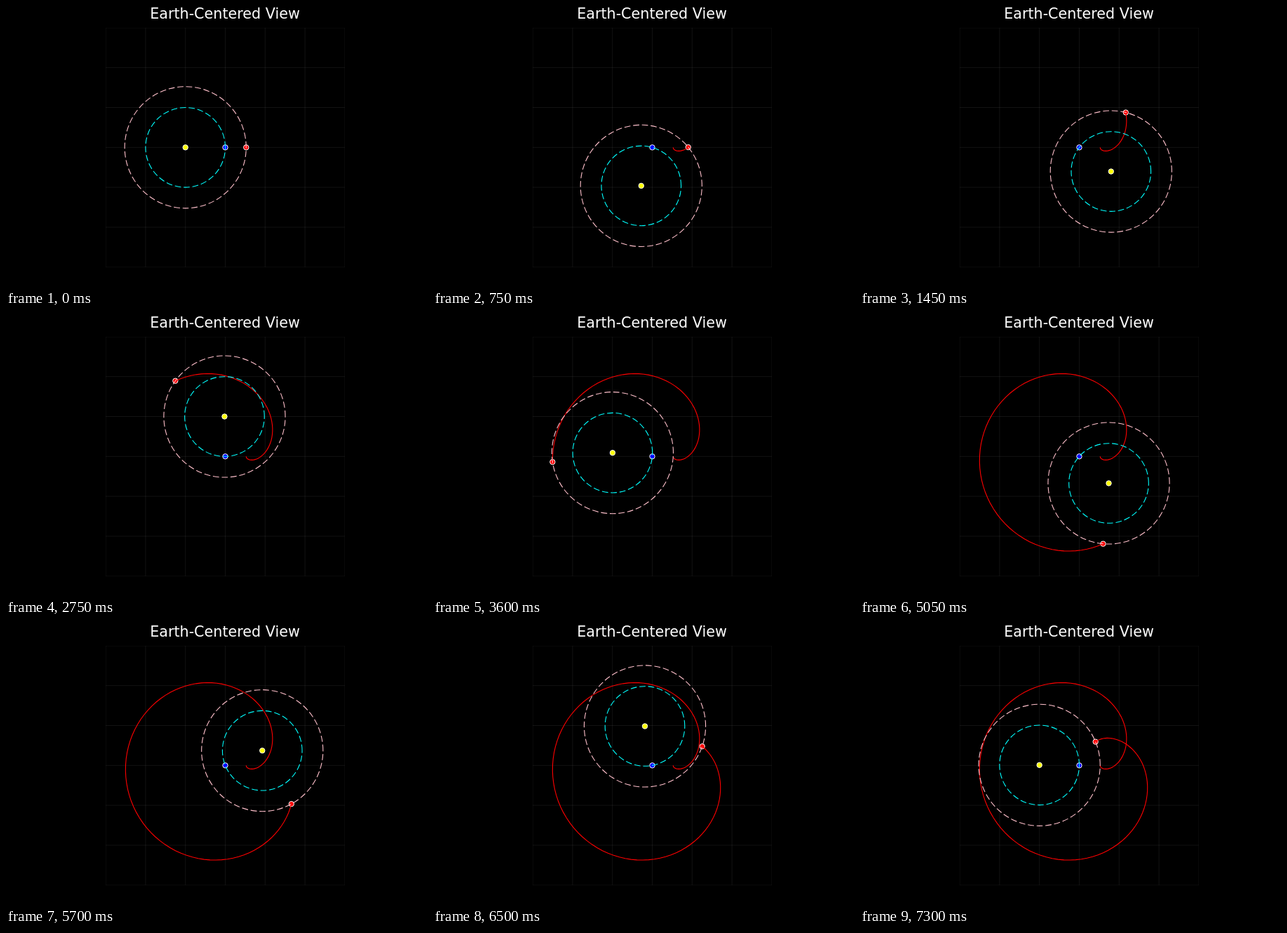
Recreate the animation shown at these times as an HTML page. Size 600 by 400 pixels, loop 7.35 s.

```html
<!DOCTYPE html>
<html lang="en">
<head>
<meta charset="utf-8">
<title>Earth-Centered View</title>
<style>
html, body { margin: 0; width: 100%; height: 100%; overflow: hidden; background: #000; }
svg { display: block; width: 600px; height: 400px; }
text { font: 20.7px "DejaVu Sans", sans-serif; fill: #fff; text-anchor: middle; }
</style>
</head>
<body>
<svg id="stage" viewBox="0 0 600 400"></svg>
<script>
const FRAME = 50, COUNT = 147, DAYS = 5;
const UNIT = 56.8, EARTH = { x: 312.5, y: 201.3 };
const EARTH_ORBIT = { r: UNIT, period: 365.25 };
const MARS_ORBIT = { r: UNIT * 1.524, period: 687 };
const LINE = 1.1;
const stage = document.getElementById("stage");

function add(tag, attrs, parent = stage) {
  const el = document.createElementNS("http://www.w3.org/2000/svg", tag);
  for (const key in attrs) el.setAttribute(key, attrs[key]);
  return parent.appendChild(el);
}

// Offset of a planet from the sun, with y pointing down.
function offset(orbit, frame) {
  const a = 2 * Math.PI * frame * DAYS / orbit.period;
  return { x: orbit.r * Math.cos(a), y: -orbit.r * Math.sin(a) };
}

function sunAt(frame) {
  const e = offset(EARTH_ORBIT, frame);
  return { x: EARTH.x - e.x, y: EARTH.y - e.y };
}

function marsAt(frame) {
  const s = sunAt(frame), m = offset(MARS_ORBIT, frame);
  return { x: s.x + m.x, y: s.y + m.y };
}

function marker(fill) {
  return add("circle", { r: 3.7, fill, stroke: "#fff", "stroke-width": 1 });
}

// Starts at the right and runs counterclockwise, which sets the dash phase.
function orbitPath(r, stroke) {
  return add("path", {
    d: `M${r} 0A${r} ${r} 0 0 0 ${-r} 0A${r} ${r} 0 0 0 ${r} 0`,
    fill: "none", stroke, "stroke-width": LINE, "stroke-dasharray": "8.8 3.8"
  });
}

function place(el, p) {
  el.setAttribute("transform", `translate(${p.x.toFixed(2)} ${p.y.toFixed(2)})`);
}

// The plot area cuts the outermost grid lines in half.
const left = 142.1, top0 = 30.9, side = 6 * UNIT;
const plot = add("svg", { x: left, y: top0, width: side, height: side, overflow: "hidden" });
plot.style.cssText = `width:${side}px;height:${side}px`;
for (let i = 0; i < 7; i++) {
  const p = i * UNIT;
  add("path", {
    d: `M${p} 0V${side}M0 ${p}H${side}`,
    stroke: "#fff", "stroke-opacity": 0.07, "stroke-width": 1
  }, plot);
}
add("text", { x: 312, y: 18 }).textContent = "Earth-Centered View";

const sun = marker("#ff0");
const earth = marker("#00f");
const mars = marker("#f00");
const trail = add("polyline", { fill: "none", stroke: "#f00", "stroke-width": LINE });
const inner = orbitPath(EARTH_ORBIT.r, "#0ff");
const outer = orbitPath(MARS_ORBIT.r, "#ffc0cb");
place(earth, EARTH);

const points = Array.from({ length: COUNT }, (_, i) => {
  const p = marsAt(i);
  return `${p.x.toFixed(2)},${p.y.toFixed(2)}`;
});

let shown = -1;
function draw(now) {
  const frame = Math.floor(now / FRAME) % COUNT;
  if (frame !== shown) {
    shown = frame;
    const s = sunAt(frame);
    for (const el of [sun, inner, outer]) place(el, s);
    place(mars, marsAt(frame));
    trail.setAttribute("points", points.slice(0, frame + 1).join(" "));
  }
}

const start = performance.now();
function tick() {
  draw(performance.now() - start);
  requestAnimationFrame(tick);
}
tick();
</script>
</body>
</html>
```
